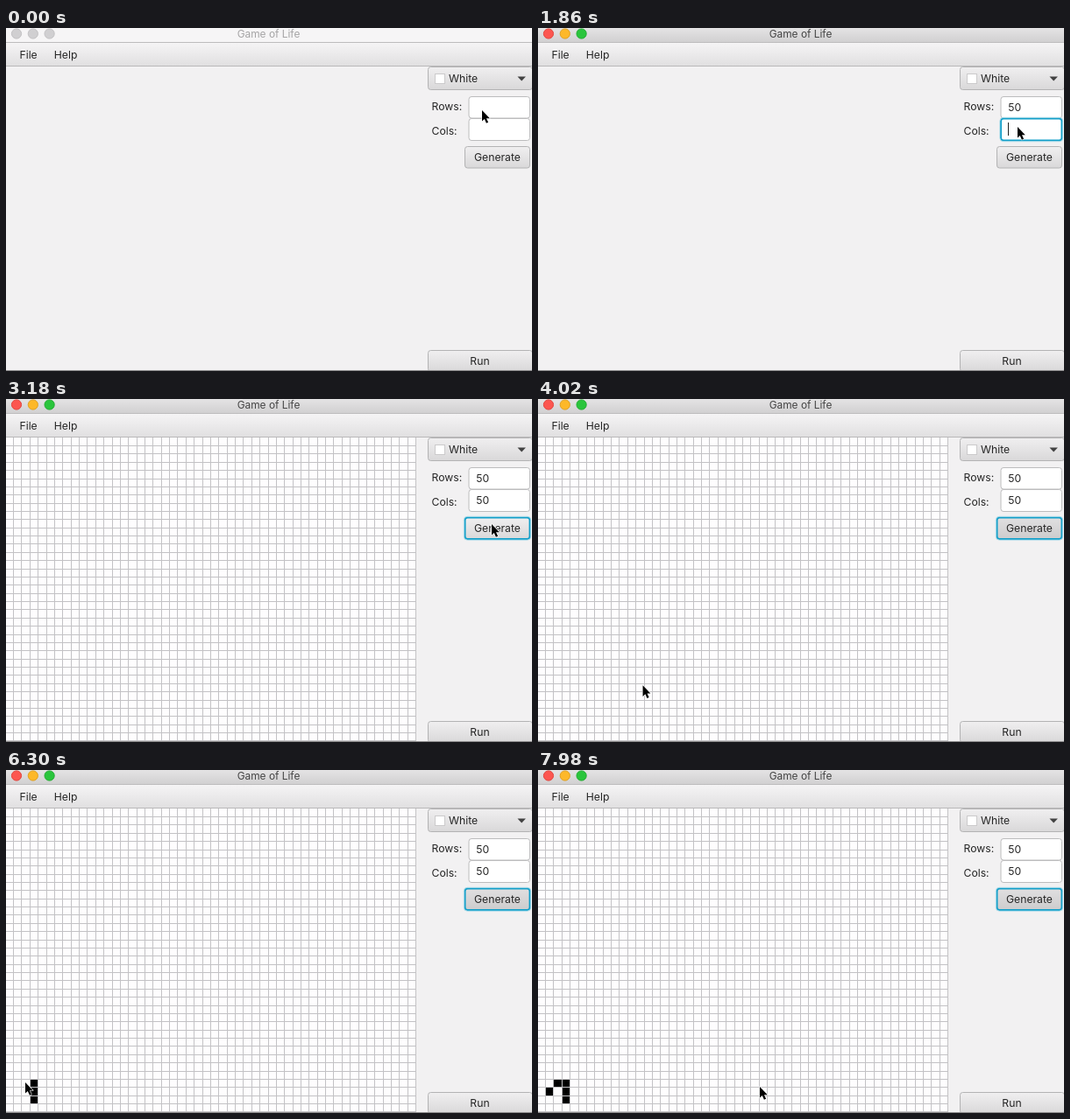
Write an HTML page that moves like this. It is 600x392 px and loops after 8 s.

```html
<!DOCTYPE html>
<html lang="en">
<head>
<meta charset="utf-8">
<title>Game of Life</title>
<style>
  html, body { margin: 0; width: 100%; height: 100%; overflow: hidden; background: #f2f1f2; }
  svg { display: block; width: 600px; height: 392px; }
  text { font: 12.2px Inter, "Open Sans", sans-serif; fill: #252525; }
  .mid { text-anchor: middle; }
  .control { fill: url(#button); stroke: #b3b3b4; }
  .field { fill: #fff; stroke: #bcbcbd; }
  .focused { stroke: #139fc9; stroke-width: 2; }
  .halo { fill: none; stroke: #a8dbe9; stroke-width: 1; }
  #generate.focused { fill: url(#buttonDark); }
  #generate.focused.hover { fill: url(#button); }
  #title { font-size: 11.9px; fill: #444; }
  .inactive #title { fill: #a5a4a5; }
  #bar { fill: url(#barActive); }
  .inactive #bar { fill: #f6f5f6; }
  .inactive #lights circle { fill: #d0cfd1; stroke: #c2c1c3; }
</style>
</head>
<body>
<svg id="window" viewBox="0 0 600 392">
  <defs>
    <linearGradient id="barActive" x2="0" y2="1">
      <stop stop-color="#e4e3e4"/><stop offset="1" stop-color="#d0cfd0"/>
    </linearGradient>
    <linearGradient id="menu" x2="0" y2="1">
      <stop stop-color="#f5f4f5"/><stop offset="1" stop-color="#e0dfe0"/>
    </linearGradient>
    <linearGradient id="button" x2="0" y2="1">
      <stop stop-color="#f0eff0"/><stop offset="1" stop-color="#d9d8d9"/>
    </linearGradient>
    <linearGradient id="buttonDark" x2="0" y2="1">
      <stop stop-color="#e0dfe0"/><stop offset="1" stop-color="#cdcccd"/>
    </linearGradient>
  </defs>

  <rect width="600" height="392" fill="#f2f1f2"/>
  <g id="board">
    <rect y="44" width="468" height="348" fill="#fefdfe"/>
    <path id="lines" fill="#c3c2c5"/>
    <path id="cells"/>
  </g>

  <rect id="bar" width="600" height="17"/>
  <rect y="16" width="600" height="1" fill="#bdbcbd"/>
  <g id="lights">
    <circle cx="12" cy="6.5" r="5.6" fill="#fc5650" stroke="#e2463f"/>
    <circle cx="30.8" cy="6.5" r="5.6" fill="#fdb829" stroke="#e0a01f"/>
    <circle cx="49.6" cy="6.5" r="5.6" fill="#2ac53c" stroke="#1fab2e"/>
  </g>
  <text id="title" class="mid" x="299.5" y="11">Game of Life</text>
  <rect y="17" width="600" height="27" fill="url(#menu)"/>
  <rect y="43" width="600" height="1" fill="#b9b8b9"/>
  <text x="15.5" y="35">File</text>
  <text x="54.8" y="35">Help</text>

  <rect class="control" x="481.5" y="44.5" width="119" height="26" rx="3"/>
  <rect x="489.5" y="52.5" width="11" height="11" fill="#fff" stroke="#cbcacb"/>
  <text x="505" y="62">White</text>
  <path d="M583.5 55.5h9.4l-4.7 5z" fill="#424242"/>

  <text x="485.5" y="94">Rows:</text>
  <text x="485.5" y="122">Cols:</text>
  <rect id="rows" class="field" x="528" y="78.5" width="69.5" height="24.5" rx="3"/>
  <rect id="cols" class="field" x="528" y="103.5" width="69.5" height="25" rx="3"/>
  <text id="rowsText" x="536.3" y="95"></text>
  <text id="colsText" x="536.3" y="120"></text>
  <rect id="caret" width="1" height="15" fill="#222"/>

  <rect id="generate" class="control" x="523.5" y="135.5" width="74" height="24.5" rx="3"/>
  <rect id="halo" class="halo" rx="4"/>
  <text class="mid" x="560.5" y="152">Generate</text>
  <rect class="control" x="481.5" y="368.5" width="119" height="24" rx="3"/>
  <text class="mid" x="540.5" y="385">Run</text>
  <rect y="391" width="600" height="1" fill="#8b8a8b"/>

  <path id="pointer" d="M0 0V12.6L2.8 10L4.9 14.7L7.1 13.7L5 9.2H8.8Z"
        stroke="#fff" stroke-width="1.2" stroke-linejoin="round" paint-order="stroke"/>
</svg>
<script>
const LOOP = 8000, TICK = 60, PITCH = 9.37;
const $ = id => document.getElementById(id);
const lineX = col => Math.floor(PITCH * col - 0.8);
const lineY = row => Math.floor(PITCH * row + 44.18);

// Pointer stops: time, x, y
const stops = [
  [0, 543, 94], [1380, 543, 94], [1640, 547, 113], [2380, 547, 113],
  [2620, 554, 143], [3480, 554, 143], [4160, 66, 350], [4560, 31.5, 376],
  [5340, 31.5, 376], [5500, 31, 367], [5740, 31, 367], [5880, 31, 358],
  [6060, 31, 358], [6240, 22, 357], [6540, 22, 357], [6720, 13, 366],
  [7080, 13, 366], [7860, 253, 362], [8000, 253, 362]
];
// Clicked cells: time, column, row
const clicks = [[5160, 3, 33 + 0 + 2 - 2 + 2], [5580, 3, 34], [5940, 3, 33], [6420, 2, 33], [6840, 1, 34]];
clicks.forEach(c => c[2] -= 0);

const typed = (t, first, second) => t < first ? "" : t < second ? "5" : "50";

function pointerAt(t) {
  const i = Math.max(1, stops.findIndex(s => s[0] > t));
  const [t0, x0, y0] = stops[i - 1], [t1, x1, y1] = stops[i];
  const p = (t - t0) / (t1 - t0), ease = p * p * (3 - 2 * p);
  return [x0 + (x1 - x0) * ease, y0 + (y1 - y0) * ease];
}

function focusAt(t) {
  return t < 360 ? null : t < 1680 ? "rows" : t < 2880 ? "cols" : "generate";
}

function drawLines() {
  let d = "";
  for (let c = 1; c <= 50; c++) d += `M${lineX(c)} 44h1v348h-1z`;
  for (let r = 1; r <= 37; r++) d += `M0 ${lineY(r)}h468v1h-468z`;
  $("lines").setAttribute("d", d);
}

function place(el, attrs) {
  for (const key in attrs) el.setAttribute(key, attrs[key]);
}

function render(t) {
  const focus = focusAt(t), [x, y] = pointerAt(t);
  const rows = typed(t, 1020, 1200), cols = typed(t, 2040, 2220);
  $("window").classList.toggle("inactive", t < 360);
  $("rowsText").textContent = rows;
  $("colsText").textContent = cols;
  for (const id of ["rows", "cols", "generate"]) $(id).classList.toggle("focused", id === focus);
  $("generate").classList.toggle("hover", x > 523 && y > 135 && y < 160);

  $("halo").style.display = focus ? "" : "none";
  if (focus) {
    const box = $(focus).getBBox();
    place($("halo"), { x: box.x - 1.2, y: box.y - 1.2, width: box.width + 2.4, height: box.height + 2.4 });
  }

  const inRows = focus === "rows", inCols = focus === "cols";
  const value = inRows ? rows : cols;
  const since = t - (inRows ? 360 : 1680);
  const blink = since % 1000 < 500;
  $("caret").style.display = (inRows || inCols) && blink ? "" : "none";
  place($("caret"), { x: 536 + value.length * 7.8, y: inRows ? 83 : 108 });

  $("board").style.display = t < 2880 ? "none" : "";
  $("cells").setAttribute("d", clicks.filter(c => t >= c[0]).map(([, c, r]) => {
    const left = lineX(c) + 1, top = lineY(r) + 1;
    return `M${left} ${top}H${lineX(c + 1)}V${lineY(r + 1)}H${left}z`;
  }).join(""));
  $("pointer").setAttribute("transform", `translate(${x} ${y})`);
}

function frame() {
  const t = performance.now() % LOOP;
  render(Math.floor(t / TICK) * TICK);
  requestAnimationFrame(frame);
}

drawLines();
render(0);
frame();
</script>
</body>
</html>
```
